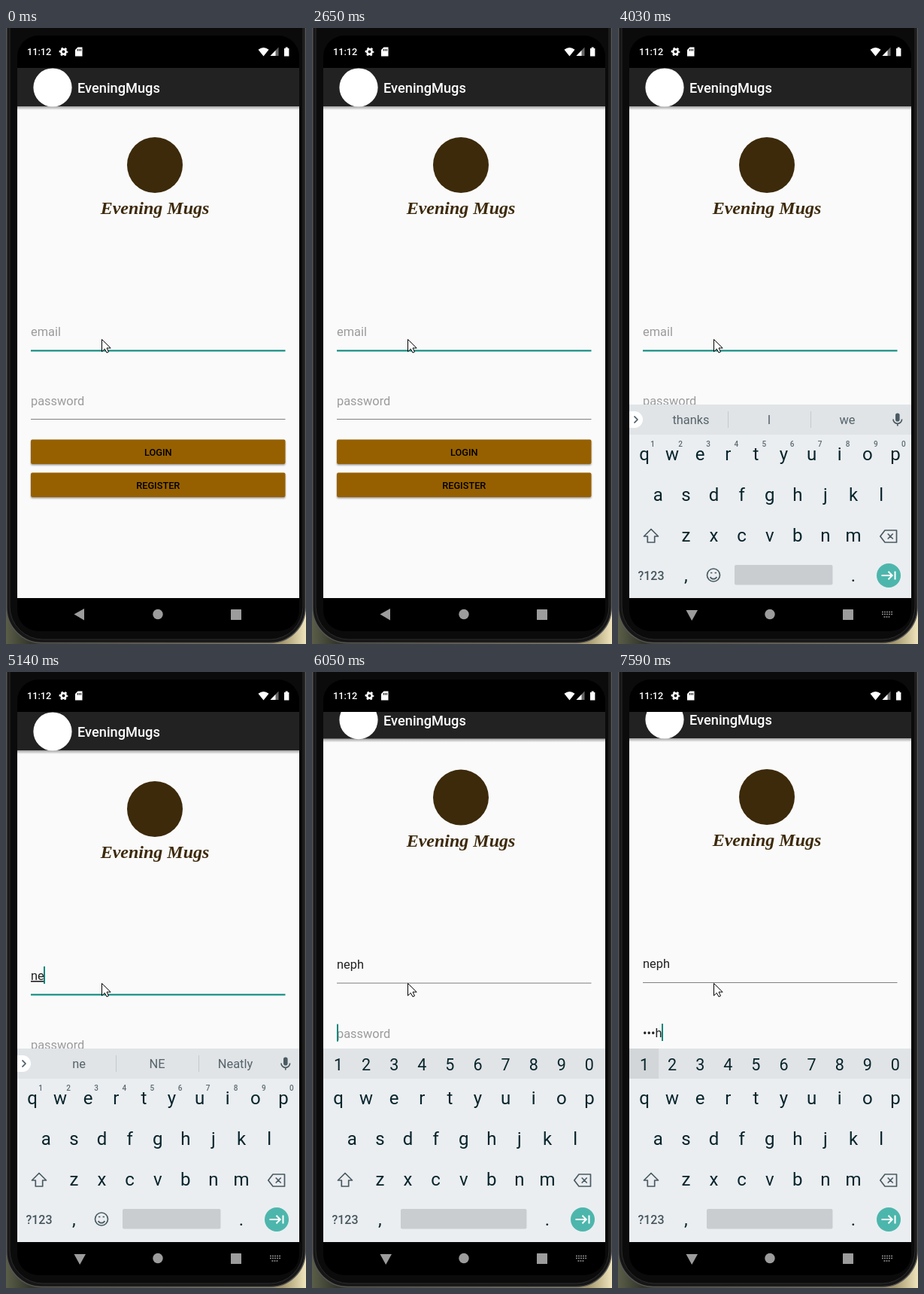
These frames come from a looping animation (399x818 px, 8 s). An HTML page:

```html
<!DOCTYPE html>
<html lang="en">
<head>
<meta charset="utf-8">
<title>Login screen</title>
<style>
  html, body { margin: 0; width: 100%; height: 100%; overflow: hidden; background: #111; }
  svg { display: block; width: 100vw; height: 100vh; }
  text { font-family: Roboto, sans-serif; white-space: pre; }
  .mid { text-anchor: middle; }
  .medium { font-weight: 500; }
  .field { font-size: 16.4px; }
  .button { font-size: 12.76px; }
  .key { font-size: 24px; fill: #08242b; }
  .digit { font-size: 21.5px; fill: #08242b; }
  .hint { font-size: 10px; fill: #5c6b72; }
  .word { font-size: 16.4px; fill: #56636a; }
  .brand { font: italic bold 24px "Liberation Serif", serif; fill: #3d2a0b; }
  .icon { fill: none; stroke: #4a5a62; stroke-width: 1.7; stroke-linejoin: round; }
</style>
</head>
<body>
<svg viewBox="0 0 399 818" preserveAspectRatio="none">
  <defs>
    <clipPath id="window"><rect x="15" y="53" width="375" height="704"/></clipPath>
    <linearGradient id="backdrop">
      <stop offset="0" stop-color="#5a5e48"/><stop offset=".08" stop-color="#33362a"/>
      <stop offset=".92" stop-color="#a3966c"/><stop offset="1" stop-color="#efe4bc"/>
    </linearGradient>
    <linearGradient id="shade" x2="0" y2="1">
      <stop stop-color="#000" stop-opacity=".36"/><stop offset="1" stop-color="#000" stop-opacity="0"/>
    </linearGradient>
    <filter id="lift" x="-5%" y="-20%" width="110%" height="150%">
      <feDropShadow dx="0" dy="1.5" stdDeviation="1.2" flood-opacity=".4"/>
    </filter>
  </defs>

  <!-- phone body -->
  <rect width="399" height="818" fill="url(#backdrop)"/>
  <rect x=".75" y="-60" width="397.5" height="876.500" rx="47" fill="#161616" stroke="#555" stroke-width="1.5"/>
  <rect x="5" y="-60" width="390" height="872" rx="44" fill="#0b0b0b" stroke="#2c2c2c"/>
  <rect x="15" y="10" width="375" height="791" rx="28"/>

  <!-- status bar -->
  <g fill="#fff">
    <text x="28" y="36" class="medium button">11:12</text>
    <circle cx="76.500" cy="31.500" r="3.200" fill="none" stroke="#fff" stroke-width="2.600"/>
    <circle cx="76.500" cy="31.500" r="5" fill="none" stroke="#fff" stroke-width="1.800" stroke-dasharray="2.618" stroke-dashoffset="1.300"/>
    <path d="M95.500 25.500H101.500V37.500H92V29Z"/>
    <path d="M95.500 28v2.500M97.500 28v2.500M99.500 28v2.500" stroke="#000"/>
    <path d="M335.500 28.800Q342.500 23 349.500 28.800L342.500 37.500Z"/>
    <path d="M362.500 25.500V37H351.500Z" fill="#666"/>
    <path d="M358.500 29.700V37H351.500Z"/>
    <path d="M370 27h1.700v-1.500h3V27h1.700v10.500H370Z"/>
  </g>

  <!-- app window -->
  <g clip-path="url(#window)">
    <rect x="15" y="53" width="375" height="704" fill="#fafafa"/>
    <g id="page">
      <rect x="15" y="104" width="375" height="5" fill="url(#shade)"/>
      <rect x="15" y="53" width="375" height="51" fill="#222"/>
      <circle cx="62" cy="79" r="25.600" fill="#fff"/>
      <text x="95" y="86" class="medium" font-size="18.230" fill="#fff">EveningMugs</text>
      <circle cx="198" cy="182" r="37" fill="#3d2a0b"/>
      <text x="198" y="247" class="mid brand">Evening Mugs</text>

      <text id="email" x="33" y="409" class="field"/>
      <rect id="emailLine" x="33" width="338.500"/>
      <text id="password" x="33" y="501" class="field"/>
      <rect x="33" y="519" width="338.500" height="1" fill="#808080"/>
      <rect id="caret" width="2" height="23" fill="#00857a"/>

      <g filter="url(#lift)" fill="#966000">
        <rect x="33" y="546.500" width="338.500" height="32.500" rx="2"/>
        <rect x="33" y="590.500" width="338.500" height="32.500" rx="2"/>
      </g>
      <text x="202.300" y="568" class="mid medium button">LOGIN</text>
      <text x="202.300" y="612" class="mid medium button">REGISTER</text>
    </g>
  </g>

  <!-- on-screen keyboard -->
  <g id="keyboard">
    <rect x="15" y="500" width="375" height="257" fill="#eaeef1"/>
    <rect x="15" y="500" width="375" height="40" fill="#e0e4e7"/>
    <g id="letters"></g>
    <g id="suggestRow">
      <path d="M146.500 509v22M256.500 509v22" stroke="#c3c9cc"/>
      <path d="M15 509H22a11 11 0 0 1 0 22H15Z" fill="#fff"/>
      <path d="M21.500 515.500l4.500 4.500-4.500 4.500" class="icon" stroke-width="2"/>
      <rect x="369" y="511.500" width="5.600" height="11" rx="2.800" fill="#4a5a62"/>
      <path d="M366 519.500a5.800 5.800 0 0 0 11.600 0M371.800 525v3.500" class="icon"/>
      <g id="words"></g>
      <circle cx="127" cy="726.500" r="8.500" class="icon"/>
      <path d="M122.700 729a4.800 4.800 0 0 0 8.600 0" class="icon"/>
      <path d="M123 723.500h2.400M128.600 723.500h2.400" class="icon" stroke-width="2.400"/>
    </g>
    <g id="digitRow">
      <rect id="pressed" x="15" y="500" width="39" height="40" fill="#d2d6d8"/>
    </g>
    <path d="M44 665.500L53.500 675H48.700V683H39.300V675H34.500Z" class="icon"/>
    <path d="M355 667H370.500V683H355L348.800 675ZM358.700 671.500l7 7M365.700 671.500l-7 7" class="icon"/>
    <text x="44" y="732.500" class="mid medium" font-size="16" fill="#45565e">?123</text>
    <rect id="space" y="713" height="26.500" rx="2" fill="#c9cdd0"/>
    <circle cx="360" cy="727" r="16" fill="#4db6ac"/>
    <path d="M350.500 727H364.500M359.500 721.800l5.200 5.200-5.200 5.200M368.500 721.500v11" fill="none" stroke="#fff" stroke-width="2"/>
  </g>

  <!-- navigation bar -->
  <g fill="#9c9c9c">
    <path id="back"/>
    <circle cx="202" cy="778.500" r="6.700"/>
    <rect x="299" y="772" width="14" height="14" rx=".5"/>
    <path id="imeIcon" d="M351 775.500h14M351 778.500h14M353.500 782h9" stroke="#9c9c9c" stroke-width="1.700" stroke-dasharray="1.800 1.250"/>
  </g>

  <path d="M127.500 413.500v16.300l3.800-3.600 2.700 5 2.500-1.200-2.500-5h5.200Z" fill="#fff" stroke="#000"/>
</svg>

<script>
const $ = id => document.getElementById(id);
const LOOP = 8000;
const KEY_STEP = 37.1;

// Each track lists [start time, value]; a value holds until the next one.
const emailTrack = [[0, ""], [4680, "n"], [5140, "ne"], [5410, "nep"], [5530, "neph"]];
const passwordTrack = [[0, ""], [6880, "n"], [7160, "•e"], [7440, "••p"], [7590, "•••h"]];
const caretTrack = [
  [0, false], [270, true], [710, false], [1270, true], [1670, false], [2250, true],
  [2650, false], [3180, true], [3600, false], [4150, true], [6480, false], [6880, true]
];
const scrollTrack = [[0, 0], [5920, 8], [6050, 15.4], [6200, 16]];
const wordTrack = [
  [0, ["thanks", "I", "we"]], [4680, ["n", "N", "no"]], [5140, ["ne", "NE", "Neatly"]],
  [5410, ["nep", "NEP", "Nep"]], [5670, ["neph", "NEPH", "Neph"]]
];
const at = (track, t) => track.findLast(([start]) => start <= t)[1];

function addText(parent, x, y, text, className) {
  const node = document.createElementNS("http://www.w3.org/2000/svg", "text");
  node.setAttribute("x", x);
  node.setAttribute("y", y);
  node.setAttribute("class", "mid " + className);
  node.textContent = text;
  return parent.appendChild(node);
}

function addRow(parent, chars, x, y, className) {
  [...chars].forEach((char, i) => addText(parent, x + i * KEY_STEP, y, char, className));
}

addRow($("letters"), "qwertyuiop", 35, 574, "key");
addRow($("letters"), "asdfghjkl", 53.3, 628, "key");
addRow($("letters"), "zxcvbnm", 90.4, 682, "key");
addRow($("letters"), ",", 90.4, 735, "key");
addRow($("letters"), ".", 313, 735, "key");
addRow($("suggestRow"), "1234567890", 46, 556, "hint medium");
addRow($("digitRow"), "1234567890", 35, 528.5, "digit");
const words = [97, 201, 305].map(x => addText($("words"), x, 526, "", "word"));

function show(id, visible) {
  $(id).setAttribute("visibility", visible ? "inherit" : "hidden");
}

function setAttrs(id, attrs) {
  for (const name in attrs) $(id).setAttribute(name, attrs[name]);
}

function setField(id, value, composing) {
  const node = $(id);
  node.textContent = value || id;
  node.style.fill = value ? "#212121" : "#9b9b9b";
  node.style.textDecoration = composing ? "underline" : "none";
  return value ? node.getComputedTextLength() : 0;
}

function render(t) {
  const onPassword = t >= 5920;
  const imeOpen = t >= 3880;
  const email = at(emailTrack, t);
  const emailWidth = setField("email", email, email && !onPassword);
  const passwordWidth = setField("password", at(passwordTrack, t), false);

  setAttrs("page", { transform: `translate(0 ${-at(scrollTrack, t)})` });
  setAttrs("emailLine", onPassword
    ? { y: 428, height: 1, fill: "#808080" }
    : { y: 427.5, height: 2, fill: "#00857a" });
  setAttrs("caret", {
    x: Math.floor(33 + (onPassword ? passwordWidth : emailWidth)),
    y: onPassword ? 483 : 391
  });
  show("caret", at(caretTrack, t));

  show("keyboard", t >= 4030);
  show("suggestRow", !onPassword);
  show("digitRow", onPassword);
  show("pressed", t >= 6200);
  setAttrs("space", onPassword ? { x: 118, width: 167.5 } : { x: 155, width: 130.5 });
  at(wordTrack, t).forEach((word, i) => words[i].textContent = word);

  setAttrs("back", { d: imeOpen ? "M90.500 773H106L98.200 787Z" : "M90.500 778.500L104 771V786.500Z" });
  show("imeIcon", imeOpen);
}

const start = performance.now();
function tick() {
  render((performance.now() - start) % LOOP);
  requestAnimationFrame(tick);
}
tick();
</script>
</body>
</html>
```
